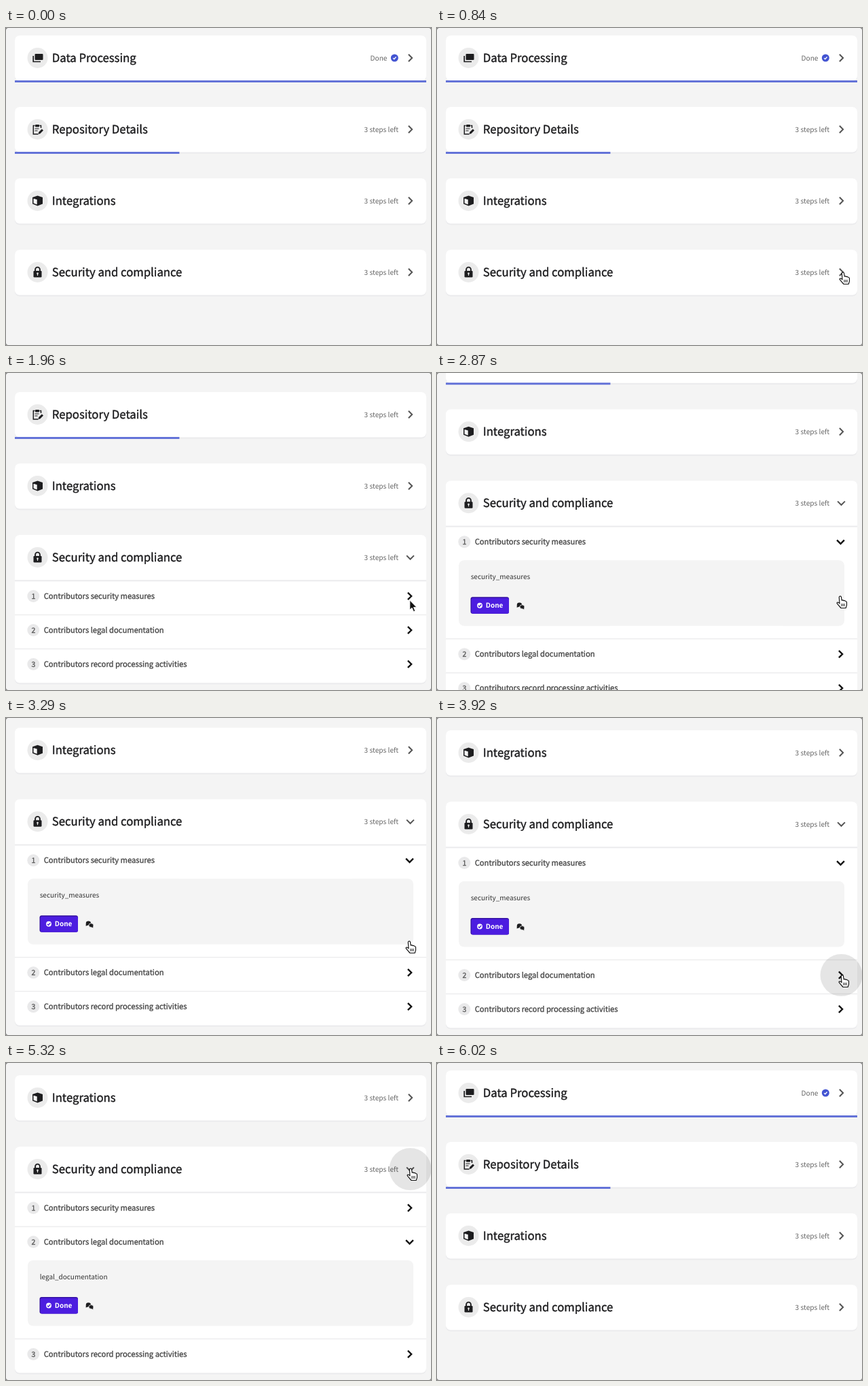
Animation, 626 px wide and 466 px high, one loop 6.37 s. Source, as an HTML page:

```html
<!DOCTYPE html>
<html lang="en">
<head>
<meta charset="utf-8">
<title>Checklist</title>
<style>
html, body { margin: 0; width: 100%; height: 100%; overflow: hidden; background: #777; }
svg { display: block; }
text {
  font-family: "Noto Sans CJK JP", "Noto Sans CJK SC", "Noto Sans CJK", sans-serif;
  font-size: 10px; fill: #333; text-rendering: geometricPrecision;
}
.title { font-size: 16.7px; fill: #1d1d1f; stroke: #1d1d1f; stroke-width: .4px; }
.status { font-size: 10.15px; fill: #666; }
.row { font-size: 11.2px; fill: #484848; stroke: #484848; stroke-width: .35px; }
.num { font-size: 10.5px; fill: #555; stroke: #555; stroke-width: .3px; text-anchor: middle; }
.button { font-weight: 700; fill: #fff; }
</style>
</head>
<body>
<svg id="stage" width="626" height="466" viewBox="0 0 626 466"></svg>
<script>
const LOOP = 6370, STEP = 70, PRESS = 210;
const ROW = 50, OPEN_ROW = 165, CARD_GAP = 105;
const INK = '#1d1d1f';
const stage = document.getElementById('stage');

const cards = [
  { icon: 'stack', name: 'Data Processing', progress: 1 },
  { icon: 'clipboard', name: 'Repository Details', progress: .4 },
  { icon: 'cube', name: 'Integrations', progress: 0 },
  { icon: 'lock', name: 'Security and compliance', progress: 0 }
];
const steps = ['security measures', 'legal documentation', 'record processing activities'];

// Clicks: [time, row], row 0 being the card header
const clicks = [[1120, 0], [2450, 1], [3990, 2], [4690, 1], [5460, 0]];
// Moves: [start, end, destination...]; each scroll overshoots, then settles
const scrollMoves = [[1500, 1790, 96], [1790, 1960, 88], [2730, 3100, 218], [3100, 3480, 203]];
const cursorMoves = [
  [70, 350, 330, 445], [350, 700, 598, 359], [1610, 2240, 594, 328], [3290, 3640, 597, 378],
  [4130, 4480, 597, 212], [4690, 5180, 596, 155], [5530, 5950, 368, 437]
];

const between = (t, a, b) => t >= a && t < b;
const easeOut = p => 1 - (1 - p) ** 2;

function travel(origin, moves, t) {
  return moves.reduce((pos, [start, end, ...goal]) => {
    const p = easeOut(Math.min(1, Math.max(0, (t - start) / (end - start))));
    return pos.map((v, i) => v + (goal[i] - v) * p);
  }, origin);
}

const isOpen = (row, t) => clicks.filter(c => c[1] === row && c[0] <= t).length % 2 === 1;

const at = (x, y, body) => `<g transform="translate(${x} ${y})">${body}</g>`;
const box = (x, y, w, h, fill, r = 0) =>
  `<rect x="${x}" y="${y}" width="${w}" height="${h}" rx="${r}" fill="${fill}"/>`;
const dot = (x, y, r, fill) => `<circle cx="${x}" cy="${y}" r="${r}" fill="${fill}"/>`;
const line = (d, color, w) => `<path d="${d}" fill="none" stroke="${color}" stroke-width="${w}"/>`;
const shape = (d, fill) => `<path d="${d}" fill="${fill}"/>`;
const label = (cls, x, y, s) => `<text class="${cls}" x="${x}" y="${y}">${s}</text>`;
const badge = (x, y, r, fill, mark) => at(x, y, dot(0, 0, r, fill) + line('M-2.2.1L-.6 1.7 2.3-1.5', mark, 1.3));
const chevron = (x, y, open, color, w) => at(x, y,
  line(open ? 'M-5.4-2.6L0 2.8 5.4-2.6' : 'M-2.6-5.2L2.6 0-2.6 5.2', color, w));

const icons = {
  stack: box(-4, -6, 12, 9, INK, 1) + line('M-6.3-3v8.5H4.5', INK, 1.7),
  clipboard: line('M3-5.5H5V-2M-4-5.5H-6.2V7H1', INK, 1.5) + box(-3.5, -7, 6, 3.4, INK, 1) +
    line('M-4-1H2M-4 2H0', INK, 1.2) + shape('M1 7l.7-3 4.6-4.6 2.2 2.2L3.9 6.3z', INK),
  cube: shape('M0-7.5L7.5-5V4.5L0 7.5-7.5 4.5V-5z', INK) + shape('M-6-3.3L-.8-1.7V5.5L-6 3.5z', '#f4f4f4'),
  lock: box(-6, -2, 12, 9.5, INK, 1.3) + line('M-3.4-1V-4a3.4 3.4 0 0 1 6.8 0v3', INK, 1.9) +
    dot(0, 1.8, 1.3, '#ebebeb') + box(-.6, 2, 1.2, 3, '#ebebeb')
};
const handCursor = `<g stroke="#111" stroke-width="1.15" stroke-linejoin="round">
  <path fill="#fff" d="M-1.7 1.6a1.6 1.6 0 0 1 3.1-.5L2.2 6.2q1.9-1 2.7.5 1.9-.8 2.5.8 2-.2 2.1 1.9l0 4-1.3 4.1H1L-4.3 11.4q-1.3-2 .3-2.4 1.5 0 3 1.9z"/>
  <path fill="none" d="M1.9 11v4m2.1-4v4m2.1-4v4" stroke-width=".9"/></g>`;
const arrowCursor = `<path d="M0 0v14l3.2-2.9 2.4 5.5 2.4-1-2.4-5.3h4.5z" fill="#111" stroke="#fff" stroke-width=".9"/>`;

function card({ icon, name, progress }, y, open, extra) {
  return at(0, y,
    box(13, -33, 606, 68.5 + extra, '#ebebed', 7) +
    box(13, -33, 606, 66.5 + extra, '#fff', 7) +
    (open ? box(13, 33.3, 606, 2, '#ebebed') : '') +
    box(13, 33, 606 * progress, 3, '#6473d8') +
    dot(46.5, 0, 15, '#ebebeb') + at(46.5, 0, icons[icon]) +
    label('title', 67.8, 6, name) +
    (progress === 1
      ? label('status', 536.6, 3.6, 'Done') + badge(572.3, 0, 5.5, '#4354d2', '#fff')
      : label('status', 527.6, 3.6, '3 steps left')) +
    chevron(595.5, 0, open, '#555', 2));
}

function panel(key) {
  return box(32, 27, 568, 96.5, '#f4f4f4', 8) +
    label('', 49.7, 54.5, key) +
    box(49.5, 81, 56.5, 24.5, '#32109f', 3) + box(50.7, 82.4, 55.3, 23.1, '#4c1de0', 2.5) +
    badge(63, 93.5, 3.9, '#fff', '#4c1de0') +
    label('button', 71.8, 97, 'Done') +
    at(123, 94, shape('M-5.2-1.8a3.6 3 0 1 1 3.6 3l-3.8 1.2z', INK) +
      `<path d="M-1.1 1.5a3.5 2.9 0 1 1 7 0l-.4 4-3.1-1.1a3.5 2.9 0 0 1-3.5-2.9z" fill="${INK}" stroke="#f4f4f4" stroke-width=".8"/>`);
}

function stepRow(name, i, y, open) {
  return at(0, y,
    (i ? box(13, -23.3, 606, 1.6, '#eeeeef') : '') +
    dot(40.3, 0, 9, '#e9e9ea') + label('num', 40.3, 3.8, i + 1) +
    label('row', 55.7, 4, 'Contributors ' + name) +
    chevron(594.5, 0, open, '#111', 2.4) +
    (open ? panel(name.replace(' ', '_')) : ''));
}

function render(t) {
  const open = isOpen(0, t);
  const [scroll] = open ? travel([0], scrollMoves, t) : [0];
  const cardY = i => 44 + i * CARD_GAP - scroll;
  const rowY = [cardY(3)];
  let y = rowY[0] + 57;
  steps.forEach((_, i) => {
    rowY.push(y);
    y += isOpen(i + 1, t) ? OPEN_ROW : ROW;
  });
  const extra = open ? y - rowY[0] - 56 : 0;

  let out = box(0, 0, 626, 466, '#f4f4f4', 3.5);
  cards.forEach((c, i) => {
    const last = i === cards.length - 1;
    out += card(c, cardY(i), last && open, last ? extra : 0);
  });
  if (open) steps.forEach((name, i) => out += stepRow(name, i, rowY[i + 1], isOpen(i + 1, t)));

  const press = clicks.find(([time]) => between(t, time - PRESS, time));
  if (press) out += dot(595.5, rowY[press[1]], 31, 'rgba(0,0,0,.1)');

  if (between(t, 70, 6020)) {
    const [cx, cy] = travel([21, 40], cursorMoves, t);
    const overCard = open ? !between(t, 1610, 2240) : cy < 395 && (cy - 11) % CARD_GAP < 69;
    out += at(cx, cy, overCard ? handCursor : arrowCursor);
  }
  stage.innerHTML = out;
}

let last = -1;
function frame() {
  const t = Math.floor(performance.now() % LOOP / STEP) * STEP;
  if (t !== last) render(last = t);
  requestAnimationFrame(frame);
}
frame();
</script>
</body>
</html>
```
